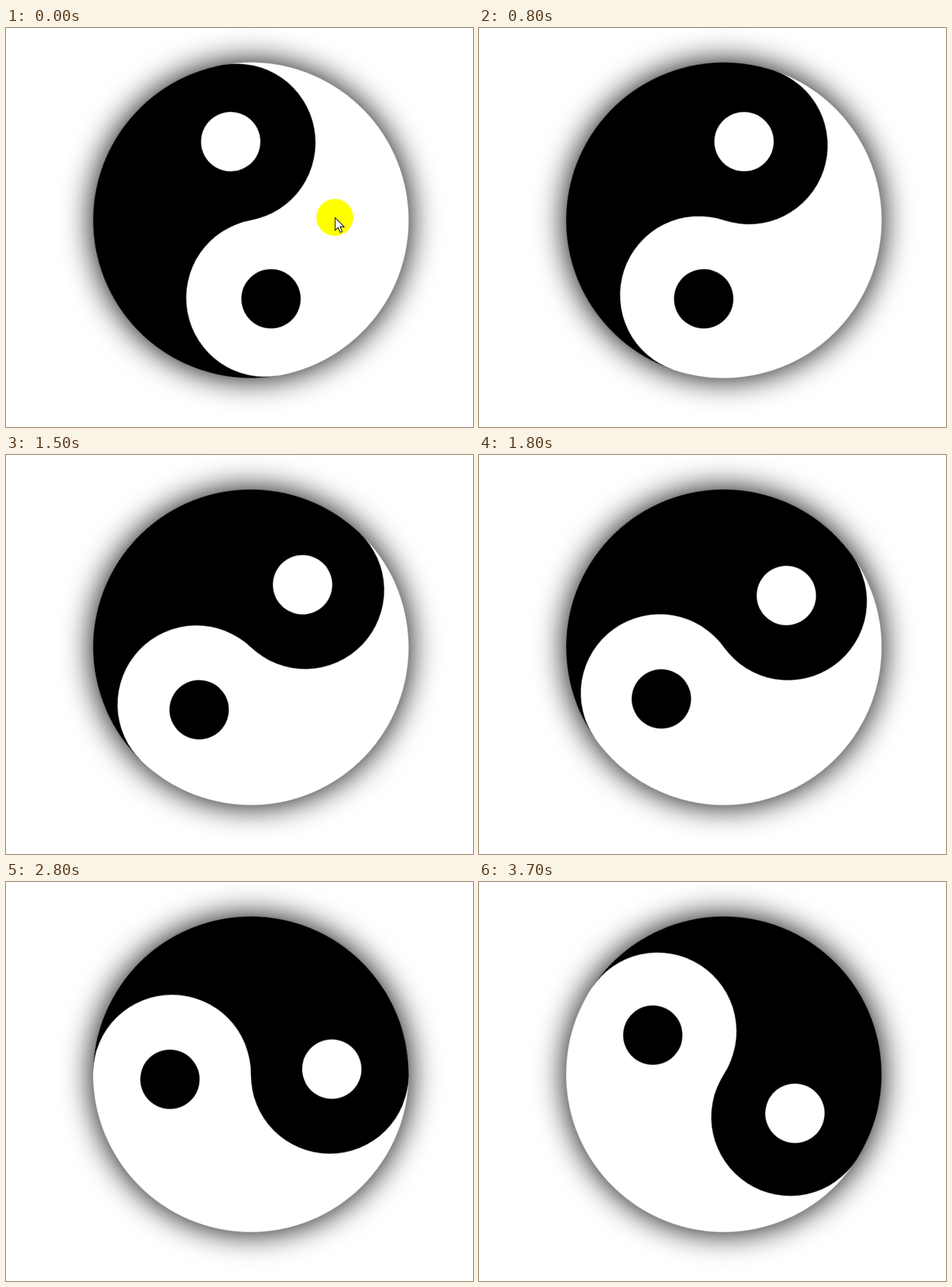
Animation of 740 by 632 pixels, one loop 3800 ms. Source, as an HTML page:

```html
<!DOCTYPE html>
<html lang="en">
<head>
<meta charset="utf-8">
<title>Yin and yang</title>
<style>
  html, body { margin: 0; width: 100%; height: 100%; overflow: hidden; background: #fff; }
  svg { display: block; width: 740px; height: 632px; }
  .glow { filter: blur(25px); }
  .disc { animation: turn 3.8s steps(38, end) -2ms infinite; }
  .pointer { animation: leave 3.8s step-end -2ms infinite; }

  /* 3.6 degrees every tenth of a second */
  @keyframes turn {
    from { transform: rotate(-10.4deg); }
    to { transform: rotate(126.4deg); }
  }

  /* one step is 1/38 of the loop */
  @keyframes leave {
    0% { transform: translate(521px, 300px); }
    5.263% { transform: translate(516px, 311px); }
    7.895% { transform: translate(500px, 346px); }
    10.526% { transform: translate(483px, 417px); }
    13.158% { transform: translate(480px, 499px); }
    15.789% { transform: translate(482px, 570px); visibility: visible; }
    18.421%, 100% { transform: translate(482px, 570px); visibility: hidden; }
  }
</style>
</head>
<body>
<svg viewBox="0 0 740 632">
  <g transform="translate(388 304.5)">
    <circle class="glow" r="250"/>
    <g class="disc">
      <circle r="250" fill="#fff"/>
      <path d="M0-250A250 250 0 0 0 0 250A125 125 0 0 1 0 0A125 125 0 0 0 0-250Z"/>
      <g transform="rotate(-4)">
        <circle cy="-128.5" r="47" fill="#fff"/>
        <circle cy="128.5" r="47"/>
      </g>
    </g>
  </g>
  <g class="pointer">
    <circle r="29.2" fill="#ff0"/>
    <path transform="translate(.5 .5) scale(1.25)" d="M0 0V16L3.7 12.5L6.6 18.6L9 17.6L6.4 11.5H11.5Z"
      fill="#fff" stroke="#000" stroke-width=".9"/>
  </g>
</svg>
</body>
</html>
```
